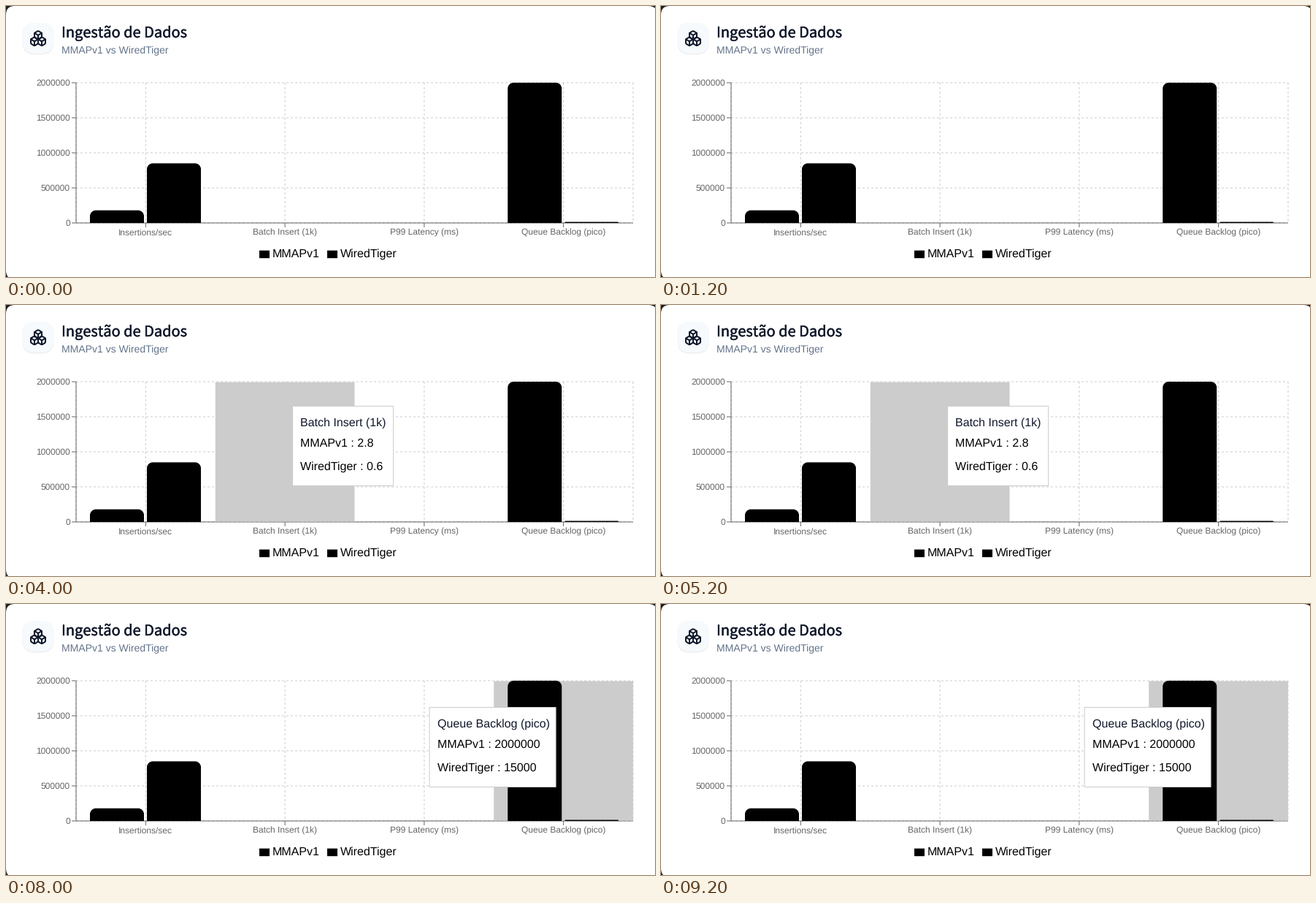
These frames come from a looping animation (889 px wide and 371 px high, 10000 ms). A matplotlib script:

```python
import numpy as np
import matplotlib as mpl
import matplotlib.pyplot as plt
from matplotlib.animation import FuncAnimation
from matplotlib.patches import FancyBboxPatch, PathPatch, Rectangle
from matplotlib.patheffects import withStroke
from matplotlib.path import Path

mpl.rcParams.update({
    "toolbar": "None",
    "font.family": ["Liberation Sans", "DejaVu Sans"],
    "text.hinting": "none",
    "path.snap": False,
})

W, H, DPI = 889, 371, 64
PX = 72 / DPI  # points per pixel

LEFT, RIGHT, TOP, BASE = 96, 859, 105, 297
MAX = 2_000_000
SERIES = ("MMAPv1", "WiredTiger")
DATA = [
    ("Insertions/sec", 180000, 850000),
    ("Batch Insert (1k)", 2.8, 0.6),
    ("P99 Latency (ms)", 450, 95),
    ("Queue Backlog (pico)", 2000000, 15000),
]
# width and top edge of each category's tooltip
TIPS = [(168, 157), (139, 138), (143, 162), (174, 141)]
TIP_H = 110
BAND = (RIGHT - LEFT) / len(DATA)
BAR, BAR_GAP, BAND_PAD = 74, 4, 19

INK, MUTED, AXIS, PALE = "#0f172a", "#64748b", "#666666", "#cccccc"

fig = plt.figure(figsize=(W / DPI, H / DPI), dpi=DPI, facecolor="#1d1f21")
ax = fig.add_axes([0, 0, 1, 1])
ax.set(xlim=(0, W), ylim=(H, 0))
ax.axis("off")


def center(i):
    return LEFT + BAND * (i + 0.5)


def line(xs, ys, color, z, **kw):
    ax.plot(xs, ys, color=color, lw=PX, zorder=z, solid_capstyle="butt", **kw)


def label(x, y, s, size, color=INK, ha="left", z=6, **kw):
    return ax.text(x, y, s, fontsize=size * PX, color=color, ha=ha,
                   va="baseline", zorder=z, **kw)


def rounded(x, y, w, h, r, color, z, alpha=1):
    ax.add_patch(FancyBboxPatch((x, y), w, h, fc=color, ec="none", alpha=alpha,
                                boxstyle=f"round,pad=0,rounding_size={r}",
                                zorder=z))


def bar(x, value):
    h = (BASE - TOP) * value / MAX
    r, top = min(8, h), BASE - h
    k = r * 0.448
    pts = [(x, BASE), (x, top + r), (x, top + k), (x + k, top), (x + r, top),
           (x + BAR - r, top), (x + BAR - k, top), (x + BAR, top + k),
           (x + BAR, top + r), (x + BAR, BASE), (x, BASE)]
    codes = [1, 2, 4, 4, 4, 2, 4, 4, 4, 2, 79]
    ax.add_patch(PathPatch(Path(pts, codes), fc="black", ec="none", zorder=4))


def cube(cx, cy):
    """Rounded hexagon with three inner edges."""
    hexagon = np.array([(0, -6), (5, -3), (5, 3), (0, 6), (-5, 3), (-5, -3)])
    pts, codes = [], []
    for i, p in enumerate(hexagon):
        before, after = hexagon[i - 1], hexagon[(i + 1) % 6]
        pts += [p + 0.2 * (before - p), p, p + 0.2 * (after - p)]
        codes += [2, 3, 3]
    codes[0] = 1
    pts.append(pts[0])
    codes.append(79)
    for end in ((-4.74, -2.85), (4.74, -2.85), (0, 5.17)):
        pts += [(0, 0), end]
        codes += [1, 2]
    path = Path(np.array(pts) + (cx, cy), codes)
    ax.add_patch(PathPatch(path, fc="none", ec=INK, lw=2 * PX, zorder=3,
                           capstyle="round", joinstyle="round"))


# card and header
rounded(0, 0, 892, 374, 12, "white", 0)
for grow, alpha in ((1, 0.015), (0.5, 0.025), (0, 0.03)):
    rounded(23 - grow, 24 - grow, 42 + 2 * grow, 42 + 2 * grow, 16 + grow, "black", 1, alpha)
rounded(23, 23, 42, 42, 16, "#f6fafd", 2)
for dx, dy in ((12, 8), (7, 16.5), (17, 16.5)):
    cube(32 + dx, 32 + dy)
label(76, 43, "Ingestão de Dados", 20, family="Noto Sans CJK JP",
      path_effects=[withStroke(linewidth=0.4 * PX, foreground=INK)])
label(76, 65, " vs ".join(SERIES), 14, MUTED)

# grid and axes
dash = dict(ls=(0, (3, 3)), dash_capstyle="butt")
for x in [LEFT, *map(center, range(len(DATA))), RIGHT]:
    line([x, x], [TOP, BASE], PALE, 1, **dash)
for v in range(0, MAX + 1, 500000):
    y = BASE - (BASE - TOP) * v / MAX
    line([LEFT, RIGHT], [y, y], PALE, 1, **dash)
    line([LEFT - 6, LEFT], [y, y], AXIS, 2)
    label(88, y + 4, str(v), 12, AXIS, "right")
line([LEFT, LEFT], [TOP, BASE], AXIS, 2)
line([LEFT, RIGHT], [BASE, BASE], AXIS, 2)

for i, (name, *values) in enumerate(DATA):
    x = center(i)
    line([x, x], [BASE, BASE + 6], AXIS, 2)
    label(x, 314, name, 12, AXIS, "center")
    for j, v in enumerate(values):
        bar(LEFT + BAND * i + BAND_PAD + j * (BAR + BAR_GAP), v)

# legend
for x, name in zip((347, 440), SERIES):
    ax.add_patch(Rectangle((x, 334.7), 14, 10.5, fc="black", ec="none", zorder=3))
    label(x + 18, 344, name, 16, "black")

# hover band and tooltip
cursor = ax.add_patch(Rectangle((0, TOP + 0.5), BAND, BASE - TOP - 1,
                                fc=PALE, ec="none", zorder=3))
box = ax.add_patch(Rectangle((0, 0), 1, TIP_H - 1, fc="white", ec=PALE, lw=PX,
                             joinstyle="miter", zorder=8))
rows = [label(0, 0, "", 16, c, z=9) for c in (INK, "black", "black")]


def update(step):
    shown = step > 0
    for artist in (cursor, box, *rows):
        artist.set_visible(shown)
    if not shown:
        return
    i = step - 1
    name, *values = DATA[i]
    w, top = TIPS[i]
    x = center(i) + 10
    if x + w > RIGHT:
        x = center(i) - 10 - w
    cursor.set_x(LEFT + BAND * i)
    box.set_xy((x + 0.5, top + 0.5))
    box.set_width(w - 1)
    texts = [name] + [f"{s} : {v}" for s, v in zip(SERIES, values)]
    for row, text, dy in zip(rows, texts, (28, 56, 88)):
        row.set_text(text)
        row.set_position((x + 11, top + dy))


anim = FuncAnimation(fig, update, frames=len(DATA) + 1, interval=2000,
                     init_func=lambda: update(0), repeat=True, repeat_delay=0)
plt.show()
```
